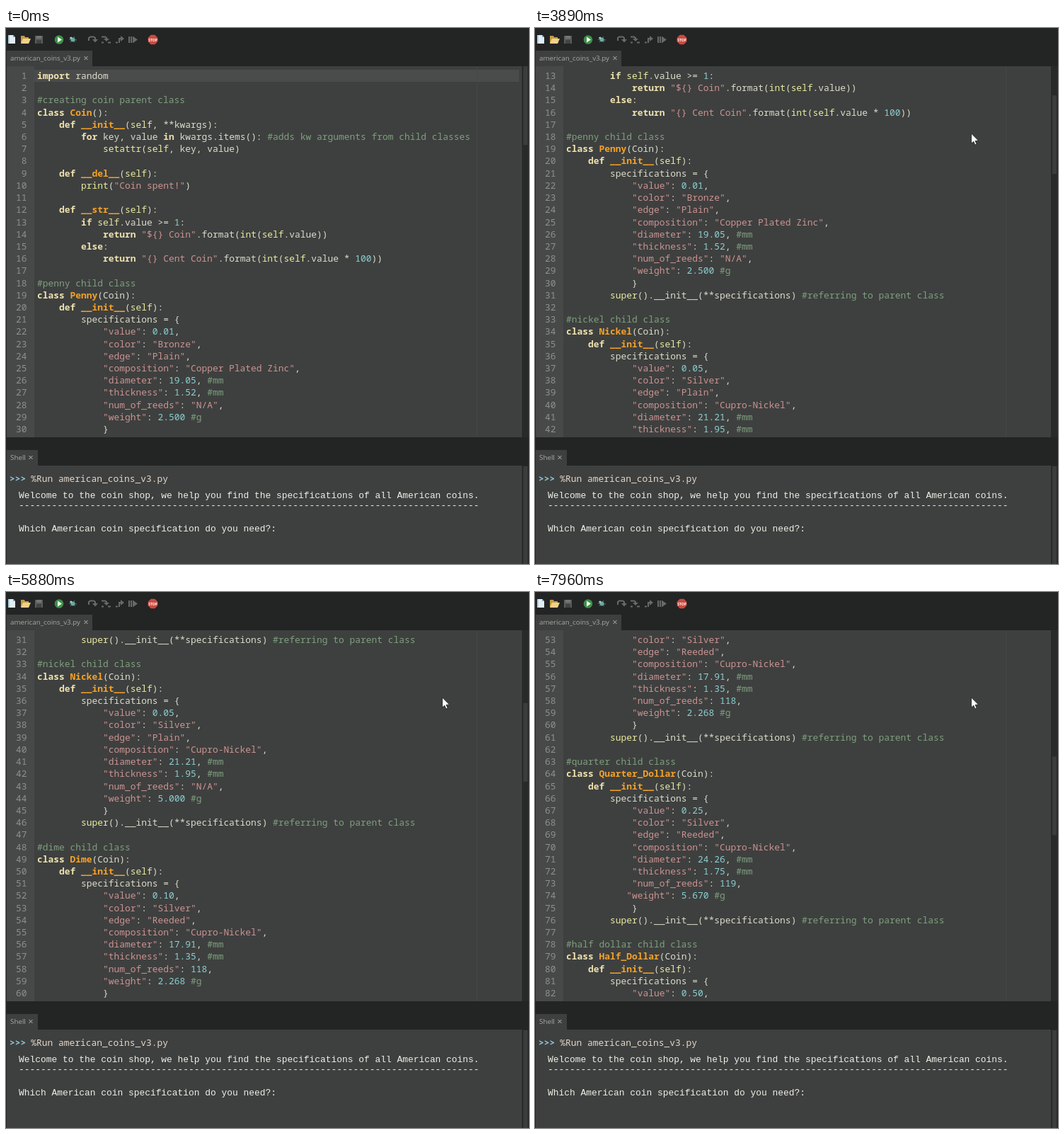
Animation of 739x757 px, one loop 8000 ms. Source, as an HTML page with a canvas:

```html
<!DOCTYPE html>
<html lang="en">
<head>
<meta charset="utf-8">
<title>Coin shop editor</title>
<style>
  html, body { margin: 0; width: 100%; height: 100%; overflow: hidden; background: #232424; }
  canvas { display: block; }
</style>
</head>
<body>
<canvas id="stage" width="739" height="757"></canvas>
<script>
const ctx = document.getElementById('stage').getContext('2d');

const LOOP = 8000, ROWS = 30, PITCH = 17.21, CHAR = 7.747;
const CODE_FONT = '12.91px "Noto Sans Mono", monospace';
const SHELL_FONT = '12.91px "Liberation Mono", monospace';
const UI_FONT = '9.8px "Open Sans", sans-serif';
const C = {
  frame: '#232424', panel: '#3e403f', gutter: '#474948', line: '#4a4b4b',
  text: '#dcdccc', keyword: '#f0e3af', def: '#f7a226', builtin: '#ebeba0',
  string: '#cc9393', number: '#8cd0d3', comment: '#7f9f7f', lineNo: '#8b918f'
};
const KEYWORDS = new Set(['import', 'class', 'def', 'for', 'in', 'if', 'else', 'return']);
const BUILTINS = new Set(['self', 'print', 'setattr', 'int', 'super']);

// Wheel notches, two lines each
const NOTCHES = [2550, 2630, 3160, 3230, 3290, 3890, 4020, 4090, 4490, 4600, 4710, 4820,
  5350, 5500, 5880, 6010, 6080, 6500, 6590, 6680, 6770, 7230, 7300, 7450, 7830, 7960];

// Pointer path: [step, x, y]
const PATH = [[0, 733, 697], [4, 670, 565], [6, 649, 440], [10, 730, 172], [12, 722, 144],
  [15, 690, 124], [19, 640, 131], [21, 621, 145], [22, 616, 149]];

function coinClass(name, value, color, edge, composition, diameter, thickness, reeds, weight) {
  const pad = ' '.repeat(12);
  const title = name.replace('_', ' ').toLowerCase().replace('quarter dollar', 'quarter');
  const weightPad = name === 'Quarter_Dollar' ? pad.slice(1) : pad;
  return [
    `#${title} child class`,
    `class ${name}(Coin):`,
    '    def __init__(self):',
    '        specifications = {',
    `${pad}"value": ${value},`,
    `${pad}"color": "${color}",`,
    `${pad}"edge": "${edge}",`,
    `${pad}"composition": "${composition}",`,
    `${pad}"diameter": ${diameter}, #mm`,
    `${pad}"thickness": ${thickness}, #mm`,
    `${pad}"num_of_reeds": ${reeds},`,
    `${weightPad}"weight": ${weight} #g`,
    `${pad}}`,
    '        super().__init__(**specifications) #referring to parent class',
    ''
  ];
}

const source = [
  'import random',
  '',
  '#creating coin parent class',
  'class Coin():',
  '    def __init__(self, **kwargs):',
  '        for key, value in kwargs.items(): #adds kw arguments from child classes',
  '            setattr(self, key, value)',
  '',
  '    def __del__(self):',
  '        print("Coin spent!")',
  '',
  '    def __str__(self):',
  '        if self.value >= 1:',
  '            return "${} Coin".format(int(self.value))',
  '        else:',
  '            return "{} Cent Coin".format(int(self.value * 100))',
  '',
  ...coinClass('Penny', '0.01', 'Bronze', 'Plain', 'Copper Plated Zinc', '19.05', '1.52', '"N/A"', '2.500'),
  ...coinClass('Nickel', '0.05', 'Silver', 'Plain', 'Cupro-Nickel', '21.21', '1.95', '"N/A"', '5.000'),
  ...coinClass('Dime', '0.10', 'Silver', 'Reeded', 'Cupro-Nickel', '17.91', '1.35', '118', '2.268'),
  ...coinClass('Quarter_Dollar', '0.25', 'Silver', 'Reeded', 'Cupro-Nickel', '24.26', '1.75', '119', '5.670'),
  ...coinClass('Half_Dollar', '0.50', 'Silver', 'Reeded', 'Cupro-Nickel', '30.61', '2.15', '150', '11.340')
];

function tokenize(line) {
  const tokens = [];
  let last = '';
  for (const m of line.matchAll(/#.*|"[^"]*"|\d+(?:\.\d+)?|\w+|[^\s\w"#]+/g)) {
    const text = m[0];
    let kind = 'text';
    if (text[0] === '#') kind = 'comment';
    else if (text[0] === '"') kind = 'string';
    else if (/^\d/.test(text)) kind = 'number';
    else if (last === 'def' || last === 'class') kind = 'def';
    else if (KEYWORDS.has(text)) kind = 'keyword';
    else if (BUILTINS.has(text)) kind = 'builtin';
    tokens.push({ text, kind, col: m.index });
    last = text;
  }
  return tokens;
}
const lines = source.map(tokenize);

function rect(x, y, w, h, color) {
  ctx.fillStyle = color;
  ctx.fillRect(x, y, w, h);
}

function poly(points, color) {
  ctx.beginPath();
  points.forEach(([x, y]) => ctx.lineTo(x, y));
  ctx.closePath();
  ctx.fillStyle = color;
  ctx.fill();
}

function disc(x, y, r, color) {
  ctx.beginPath();
  ctx.arc(x, y, r, 0, Math.PI * 2);
  ctx.fillStyle = color;
  ctx.fill();
}

function stroke(points, color, width = 1) {
  ctx.beginPath();
  points.forEach(([x, y]) => ctx.lineTo(x, y));
  ctx.strokeStyle = color;
  ctx.lineWidth = width;
  ctx.stroke();
}

function label(text, x, y, font, color, align = 'left') {
  ctx.font = font;
  ctx.fillStyle = color;
  ctx.textAlign = align;
  ctx.fillText(text, x, y);
}

function drawToolbar() {
  const grey = '#686a69';
  // new file, open, save
  poly([[3, 10], [10, 10], [13, 13], [13, 22], [3, 22]], '#e4edf2');
  poly([[10, 10], [13, 13], [10, 13]], '#76aed0');
  rect(3, 10, 2, 12, '#a9cfe2');
  poly([[21, 11], [26, 11], [27, 13], [32, 13], [32, 21], [21, 21]], '#c49a48');
  poly([[24, 15], [35, 15], [32, 22], [21, 22]], '#f0d18a');
  rect(41, 11, 11, 11, '#5b5d5c');
  rect(43, 11, 7, 4, '#747675');
  rect(43, 17, 7, 5, '#424443');
  // run
  disc(75, 16.5, 6.3, '#3f8f4a');
  poly([[73, 12.5], [79, 16.5], [73, 20.5]], '#f4fff2');
  // debug
  stroke([[90, 13], [98, 20]], '#4a8580');
  stroke([[91, 20], [97, 12]], '#4a8580');
  stroke([[89, 16], [100, 17]], '#4a8580');
  disc(94.5, 16.5, 3, '#69aaa2');
  disc(92, 14, 1.6, '#a6d5c5');
  // step buttons
  stroke([[117, 18], [117, 14], [119, 12.5], [124, 12.5], [126, 14], [126, 17]], grey, 2);
  poly([[122, 16], [130, 16], [126, 20.5]], grey);
  stroke([[135, 12.5], [140, 12.5], [142, 14], [142, 16]], grey, 2);
  poly([[138, 15], [146, 15], [142, 19]], grey);
  stroke([[135, 20.5], [138, 20.5]], grey, 2);
  stroke([[144, 20.5], [148, 20.5]], grey, 2);
  stroke([[155, 20.5], [158, 20.5]], grey, 2);
  stroke([[160, 21], [160, 15], [163, 15]], grey, 2);
  poly([[162, 11], [167, 15], [162, 19]], grey);
  rect(173, 12, 2, 9, grey);
  rect(176, 12, 2, 9, grey);
  poly([[179, 11.5], [186, 16.5], [179, 21.5]], grey);
  // stop
  const octagon = Array.from({ length: 8 }, (_, i) => {
    const a = (i + 0.5) * Math.PI / 4;
    return [207.5 + 7.4 * Math.cos(a), 16.5 + 7.4 * Math.sin(a)];
  });
  poly(octagon, '#cc4a3f');
  label('STOP', 207.5, 18.5, 'bold 5px "Open Sans", sans-serif', '#fff', 'center');
}

function drawTab(text, y, width, closeX) {
  rect(1, y, width - 1, 22, C.panel);
  label(text, 6, y + 14, UI_FONT, '#a5a8a6');
  const cy = y + 10.5;
  stroke([[closeX - 2.5, cy - 2.5], [closeX + 2.5, cy + 2.5]], '#b9bbb9');
  stroke([[closeX + 2.5, cy - 2.5], [closeX - 2.5, cy + 2.5]], '#b9bbb9');
}

function drawEditor(top) {
  rect(1, 54, 728, 524, C.panel);
  rect(1, 54, 39, 524, C.gutter);
  if (top === 0) rect(40, 59, 685, 17, C.line);
  rect(665, 54, 1, 524, '#454746');
  rect(729, 54, 10, 524, '#282929');
  rect(731, 54 + top * 3.43, 6, 111, '#3b3c3c');

  for (let i = 0; i < ROWS; i++) {
    const y = Math.round(72 + i * PITCH);
    label(top + i + 1, 29.5, y, CODE_FONT, C.lineNo, 'right');
    for (const { text, kind, col } of lines[top + i]) {
      const bold = kind === 'def' || kind === 'keyword' ? 'bold ' : '';
      label(text, 44 + col * CHAR, y, bold + CODE_FONT, C[kind]);
    }
  }
}

function drawShell() {
  rect(1, 618, 728, 139, C.panel);
  rect(729, 618, 10, 139, '#282929');
  rect(731, 619, 6, 138, '#3b3c3c');
  label('>>>', 5, 641, 'bold ' + CODE_FONT, '#8fcbe0');
  label('%Run american_coins_v3.py', 35.3, 641, CODE_FONT, '#e6d6c8');
  const say = (text, y) => label(text, 18, y, SHELL_FONT, '#efefe6');
  say('Welcome to the coin shop, we help you find the specifications of all American coins.', 664);
  say('-'.repeat(84), 678);
  say('Which American coin specification do you need?:', 711);
}

function pointerAt(step) {
  const last = PATH.length - 1;
  const i = Math.min(last - 1, PATH.findLastIndex(p => p[0] <= step));
  const slope = (k, axis) => {
    const a = PATH[Math.max(0, k - 1)], b = PATH[Math.min(last, k + 1)];
    return (b[axis] - a[axis]) / (b[0] - a[0]);
  };
  const p = PATH[i], q = PATH[i + 1], span = q[0] - p[0], u = (step - p[0]) / span;
  return [1, 2].map(axis =>
    p[axis] * (1 + 2 * u) * (1 - u) ** 2 + q[axis] * u * u * (3 - 2 * u) +
    span * (slope(i, axis) * u * (1 - u) ** 2 - slope(i + 1, axis) * u * u * (1 - u)));
}

function drawPointer(t) {
  if (t < 390) return;
  const step = t < 1210
    ? Math.min(10, Math.floor((t - 390) / 75))
    : Math.min(22, 11 + Math.floor((t - 1210) / 73.6));
  const [x, y] = pointerAt(step).map(Math.round);
  const shape = [[0, 0], [0, 14], [3.2, 11.2], [5.4, 16], [7.6, 15], [5.5, 10.4], [10, 10]]
    .map(([dx, dy]) => [x + 0.5 + dx, y + dy]);
  poly(shape, '#fff');
  stroke([...shape, shape[0]], '#1c1c1c', 0.8);
}

function draw(t) {
  rect(0, 0, 739, 757, C.frame);
  drawToolbar();
  drawTab('american_coins_v3.py', 32, 122, 113);
  drawTab('Shell', 596, 45, 35);
  drawEditor(2 * NOTCHES.filter(n => n <= t).length);
  drawShell();
  drawPointer(t);
}

const start = performance.now();
function tick() {
  draw((performance.now() - start) % LOOP);
  requestAnimationFrame(tick);
}
tick();
</script>
</body>
</html>
```
